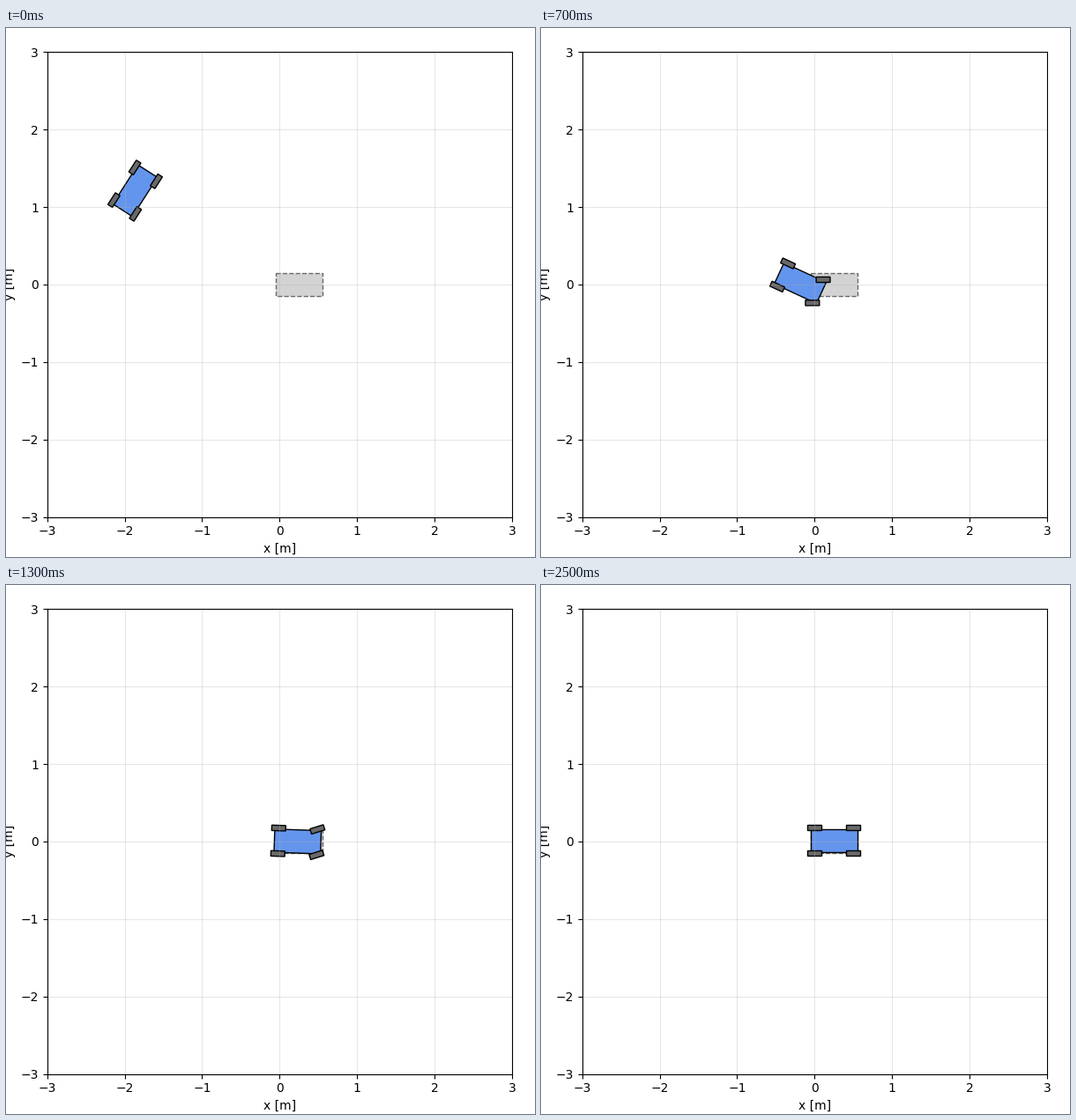
Animation, 600 px wide and 600 px high, one loop 2.55 s. Source, as a matplotlib script:

```python
import numpy as np
import matplotlib.pyplot as plt
from matplotlib.animation import FuncAnimation
from matplotlib.patches import Polygon

FRAMES, INTERVAL = 51, 50
WHEELBASE, TRACK = 0.5, 0.33
BODY_L, BODY_W = 0.6, 0.3
WHEEL_L, WHEEL_W = 0.18, 0.07
OVERHANG = 0.05
TURN_END, LOCK_STEP, LAST = 6, 18, FRAMES - 1

# Key poses of the rear axle: step, x, y, heading [deg]
KEYS = [
    (0, -2, 1, 57.3),
    (TURN_END, -1.275, .905, -47.3),
    (10, -.774, .376, -40),
    (LOCK_STEP, -.205, .041, -13.6),
    (34, .023, .012, -.1),
    (LAST, -.002, .012, 0),
]


def speed(k):
    """Distance per step: quick run-up, slower fall to a stop."""
    width = 4.5 if k < TURN_END else 8.5
    return .205 * np.exp(-(abs(k - TURN_END) / width) ** 1.5)


def steering(k):
    """Sharp right turn, then ease to the left and back to straight."""
    if k < TURN_END:
        angle = -53 if k > 0 else 0
    elif k < LOCK_STEP:
        angle = 29 * np.sin(np.pi / 2 * (k - TURN_END) / (LOCK_STEP - TURN_END))
    else:
        angle = 29 * ((LAST - k) / (LAST - LOCK_STEP)) ** 1.4
    return np.radians(angle)


def pose_and_rate(key):
    """Pose at a key and its change per step by the bicycle model."""
    k, x, y, degrees = key
    heading, v = np.radians(degrees), speed(k)
    rate = (v * np.cos(heading), v * np.sin(heading),
            v * np.tan(steering(k)) / WHEELBASE)
    return np.array([x, y, heading]), np.array(rate)


def pose(k):
    """Cubic Hermite path between the two neighbouring keys."""
    start, end = next((a, b) for a, b in zip(KEYS, KEYS[1:]) if k <= b[0])
    (p, dp), (q, dq) = pose_and_rate(start), pose_and_rate(end)
    span = end[0] - start[0]
    u = (k - start[0]) / span
    ease = u * u * (3 - 2 * u)
    return (p + (q - p) * ease
            + span * u * (1 - u) * ((1 - u) * dp - u * dq))


def rotate(points, angle):
    c, s = np.cos(angle), np.sin(angle)
    return points @ np.array([[c, s], [-s, c]])


def box(length, width):
    a, b = length / 2, width / 2
    return np.array([(-a, b), (a, b), (a, -b), (-a, -b)])


body_shape = box(BODY_L, BODY_W) + (BODY_L / 2 - OVERHANG, 0)
wheel_shape = box(WHEEL_L, WHEEL_W)
mounts = [(x, y) for x in (0, WHEELBASE) for y in (TRACK / 2, -TRACK / 2)]

fig, ax = plt.subplots(figsize=(6, 6), dpi=100)
fig.tight_layout()
ax.set_aspect("equal")
ax.set_xlim(-3, 3)
ax.set_ylim(-3, 3)
ax.set_xlabel("x [m]")
ax.set_ylabel("y [m]")
ax.grid(True, alpha=0.3)


def add_part(shape, color, edge="black", style="-"):
    return ax.add_patch(Polygon(shape, closed=True, facecolor=color,
                                edgecolor=edge, linestyle=style, linewidth=1))


add_part(body_shape, "lightgray", "dimgray", "--")
body = add_part(body_shape, "cornflowerblue")
wheels = [add_part(wheel_shape, "dimgray") for _ in mounts]


def update(frame):
    x, y, heading = pose(frame)
    body.set_xy(rotate(body_shape, heading) + (x, y))
    for wheel, mount in zip(wheels, mounts):
        angle = steering(frame) if mount[0] > 0 else 0
        shape = rotate(wheel_shape, angle) + mount
        wheel.set_xy(rotate(shape, heading) + (x, y))
    return [body, *wheels]


def init():
    return update(0)


anim = FuncAnimation(fig, update, frames=FRAMES, init_func=init,
                     interval=INTERVAL, repeat=True, repeat_delay=0)
plt.show()
```
